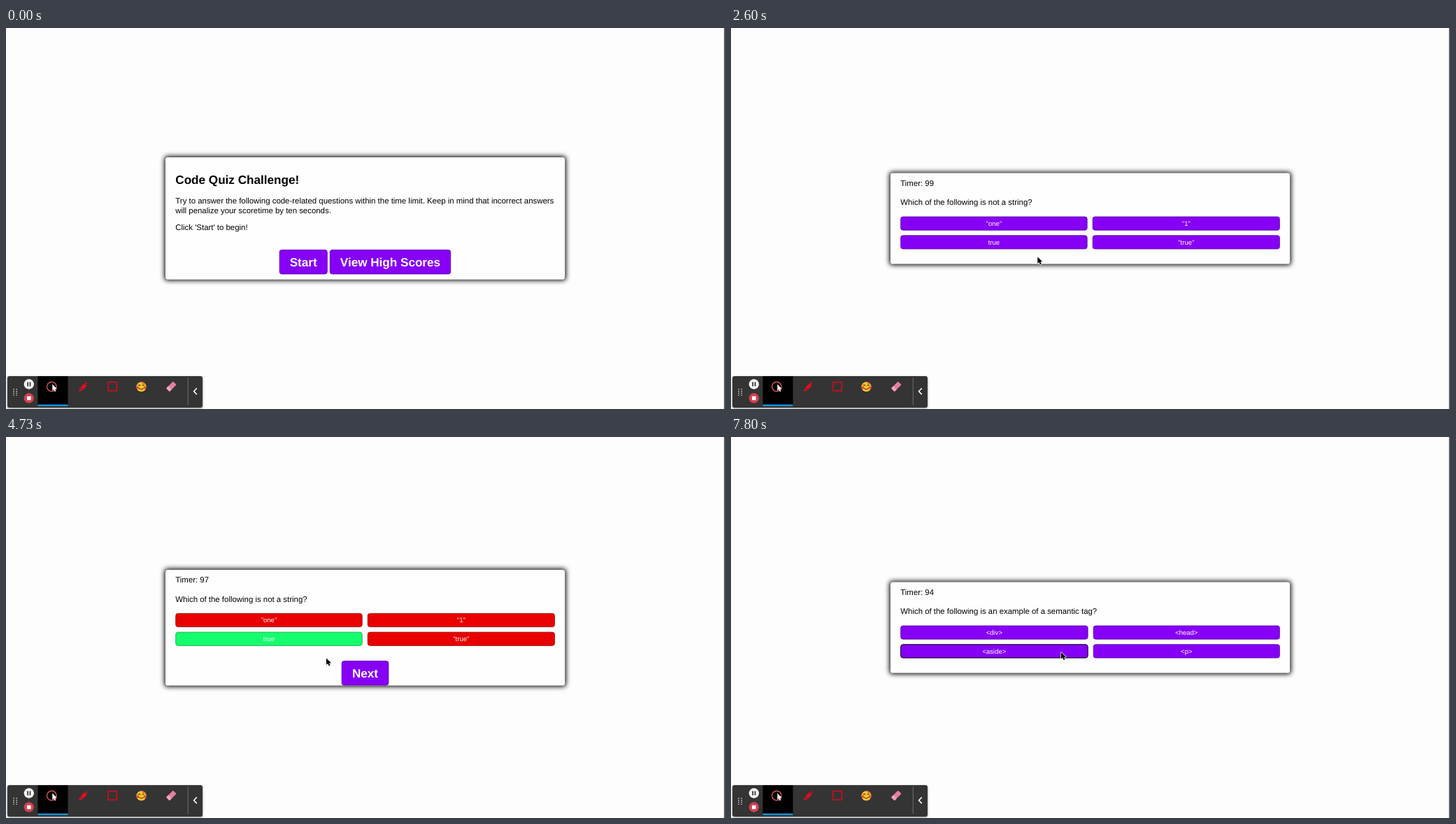
An HTML page for the animation above (8 s loop, 1028 by 545 pixels).

```html
<!DOCTYPE html>
<html lang="en">
<head>
<meta charset="utf-8">
<title>Code Quiz Challenge</title>
<style>
  html, body { margin: 0; width: 100%; height: 100%; overflow: hidden; background: #fdfdfd; }
  svg { display: block; width: 100%; height: 100%; }
  text { font: 11.42px "Liberation Sans", Arial, sans-serif; text-rendering: geometricPrecision; }
  .big { font-size: 17.13px; font-weight: 700; }
  .small { font-size: 9.52px; }
  .label { font: 700 7.1px Roboto, sans-serif; }
  .mid { text-anchor: middle; fill: #fff; }
  .shadow { filter: blur(3.57px); }
</style>
</head>
<body>
<svg viewBox="0 0 1028 545">
  <rect x="1026.7" width="1.3" height="545" fill="#444"/>
  <g id="screen"></g>

  <g id="toolbar">
    <rect x="2" y="499" width="279" height="45" rx="3" opacity=".5" style="filter:blur(1.5px)"/>
    <rect x="2" y="498" width="279" height="45" rx="3" fill="#343434"/>
    <rect x="45.5" y="498" width="43" height="42.5"/>
    <rect x="45.5" y="538.6" width="43" height="2.2" fill="#1a9fe8"/>
    <path d="M11 516v10M15.2 516v10" stroke="#ccc" stroke-width="1.5" stroke-dasharray="1.5 1.4"/>
    <circle cx="32.8" cy="509.5" r="7.2" fill="#f4f4f4"/>
    <path d="M31.2 506.5v6M34.5 506.5v6" stroke="#222" stroke-width="1.6"/>
    <circle cx="32.8" cy="529.5" r="7.2" fill="#d3414e"/>
    <rect x="30" y="526.7" width="5.6" height="5.6" rx=".6" fill="#fff"/>

    <circle cx="65.3" cy="513" r="6.8" fill="none" stroke="#d2525c" stroke-width="1.4"/>
    <path d="M66.3 509.5v9.4l2.1-1.9 1.5 3.3 1.5-.7-1.5-3.2 2.9-.2z" fill="#fff"/>
    <path d="M104 520l1.5-5 3.5 3.4zM106.3 514.2l5.9-6 3.5 3.5-5.9 6zM113 507.4l1.2-1.2 2.3 2.2-1.2 1.6z" fill="#e30d1d"/>
    <rect x="146" y="506.6" width="12.4" height="12.4" fill="none" stroke="#d90b1a" stroke-width="1.5"/>
    <circle cx="193.5" cy="513.3" r="7" fill="#f7c32e"/>
    <path d="M189 511.6q1.6-2 3.2 0M194.8 511.6q1.6-2 3.2 0M190.3 515.2q3.2 3.4 6.4 0" fill="none" stroke="#6b3b10" stroke-width="1.1"/>
    <g fill="#e8453c"><circle cx="188.3" cy="514.5" r="1.9"/><circle cx="198.8" cy="514.5" r="1.9"/><circle cx="196.5" cy="507.5" r="1.5"/></g>
    <g transform="rotate(-45 236.3 512.8)">
      <rect x="229.3" y="509.4" width="14" height="6.8" rx="1" fill="#e57da0"/>
      <rect x="229.3" y="509.4" width="4.5" height="6.8" rx="1" fill="#f0a5bd"/>
    </g>
    <path d="M260.3 500v39" stroke="#777" stroke-width=".9"/>
    <path d="M272.8 515.3l-4.2 4.4 4.2 4.4" fill="none" stroke="#fff" stroke-width="1.6"/>
  </g>

  <circle id="ring" fill="none" stroke="#ef5c68" stroke-opacity=".85"/>
  <path id="cursor" d="M0 0v9.6l2.2-2 1.5 3.5 1.8-.8-1.5-3.4 3-.2z" stroke="#fff" stroke-width="1.3" paint-order="stroke" stroke-linejoin="round"/>
</svg>

<script>
const LOOP = 8000, TICK = 200 / 3;
const PURPLE = ['#8700f6', '#5600a3'], RED = ['#e90000', '#8d0000'], GREEN = ['#14fd6c', '#10a34b'];
const get = id => document.getElementById(id);

// Pointer waypoints: time, x, y
const path = [
  [190, 655, 550], [1000, 470, 343], [1130, 434.5, 336], [1600, 434.5, 336], [1930, 437, 334],
  [2460, 437, 334], [3000, 442, 309], [3800, 442, 309], [4260, 456, 315.3], [4600, 456, 315.3],
  [4733, 458, 316.5], [5400, 493, 330], [7000, 493, 330], [7800, 472, 308]
];
const clicks = [1460, 3660, 5600];
const questions = [
  { ask: 'Which of the following is not a string?', split: 509.6, answers: ['"one"', '"1"', 'true', '"true"'] },
  { ask: 'Which of the following is an example of a semantic tag?', split: 510.6,
    answers: ['&lt;div&gt;', '&lt;head&gt;', '&lt;aside&gt;', '&lt;p&gt;'] }
];

const text = (x, y, s, cls = '') => `<text x="${x}" y="${y}" class="${cls}">${s}</text>`;

const card = (y, h) =>
  `<rect class="shadow" x="226.6" y="${y - 1.4}" width="573.9" height="${h + 2.8}" rx="4"/>
   <rect x="228" y="${y}" width="571.1" height="${h}" rx="3.6" fill="#fefefe"/>`;

function button(x, y, w, h, label, mouse, [fill, edge] = PURPLE) {
  const [mx, my] = mouse, big = h > 30;
  const hover = mx >= x && mx <= x + w && my >= y && my <= y + h;
  return `<rect x="${x + .4}" y="${y + .4}" width="${w - .8}" height="${h - .8}" rx="3.3"
    fill="${fill}" stroke="${hover ? '#000' : edge}" stroke-width="${hover ? 1 : .8}"/>` +
    text(x + w / 2, y + h / 2 + (big ? 6.1 : 3.4), label, big ? 'mid big' : 'mid small');
}

function startScreen(mouse) {
  return card(185, 174.7) +
    text(242.3, 222.6, 'Code Quiz Challenge!', 'big') +
    text(242.3, 251.1, 'Try to answer the following code-related questions within the time limit. Keep in mind that incorrect answers') +
    text(242.3, 264.5, 'will penalize your scoretime by ten seconds.') +
    text(242.3, 289.2, "Click 'Start' to begin!") +
    button(390.7, 317, 69, 35.3, 'Start', mouse) +
    button(462.8, 317, 173.3, 35.3, 'View High Scores', mouse);
}

function quizScreen({ ask, split, answers }, timer, answered, mouse) {
  const top = answered ? 190 : 207.6;
  const colors = i => !answered ? PURPLE : answers[i] === 'true' ? GREEN : RED;
  const grid = answers.map((label, i) => {
    const x = i % 2 ? split + 7.2 : 242.3;
    const right = i % 2 ? 784.8 : split;
    return button(x, top + 62 + (i > 1 ? 26.8 : 0), right - x, 20, label, mouse, colors(i));
  });
  return card(top, answered ? 165.5 : 129.9) +
    text(242.3, top + 18, 'Timer: ' + timer) +
    text(242.3, top + 45.5, ask) + grid.join('') +
    (answered ? button(479.7, 320, 67.6, 35.5, 'Next', mouse) : '');
}

function pointer(t) {
  if (t < path[0][0]) return [-50, -50];
  const i = path.findIndex(p => p[0] > t);
  if (i < 0) return path[path.length - 1].slice(1);
  const [a, b] = [path[i - 1], path[i]];
  const k = (t - a[0]) / (b[0] - a[0]);
  return [a[1] + (b[1] - a[1]) * k, a[2] + (b[2] - a[2]) * k];
}

// The ring swells on press and shrinks on release.
function ringRadius(t) {
  const step = Math.floor((t - Math.max(0, ...clicks.filter(c => c <= t))) / TICK);
  return t < clicks[0] ? 0 : [13, 22.6, 11.4][step] || 0;
}

let shown = '';
function draw(now) {
  const t = Math.floor((now % LOOP + 10) / TICK) * TICK;
  const mouse = pointer(t), [x, y] = mouse;
  const timer = 100 - Math.max(0, Math.floor((t - 1590) / 1000));
  const html = t < 1590 ? startScreen(mouse)
    : quizScreen(questions[t < 5720 ? 0 : 1], timer, t > 3790 && t < 5720, mouse);
  if (html !== shown) get('screen').innerHTML = shown = html;

  get('cursor').setAttribute('transform', `translate(${x} ${y})`);
  const r = ringRadius(t), ring = get('ring');
  ring.setAttribute('cx', x + .6);
  ring.setAttribute('cy', y + 2);
  ring.setAttribute('r', r);
  ring.setAttribute('stroke-width', r * .115);
}

function loop() {
  draw(performance.now());
  requestAnimationFrame(loop);
}
loop();
</script>
</body>
</html>
```
